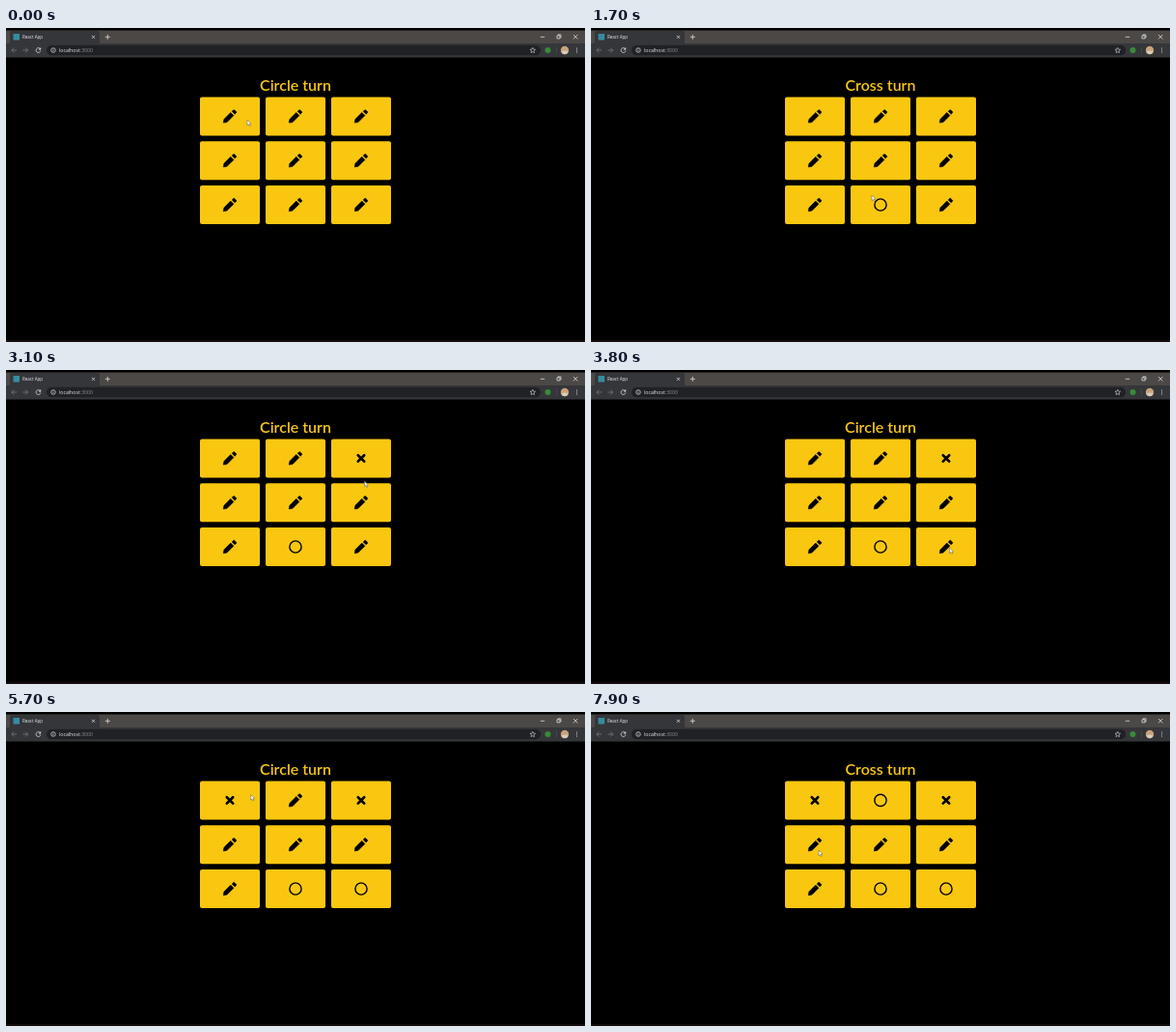
An HTML page for the animation above (8 s loop, 600 px wide and 325 px high).

```html
<!DOCTYPE html>
<html lang="en">
<head>
<meta charset="utf-8">
<title>Noughts and crosses</title>
<style>
  html, body { margin: 0; width: 100%; height: 100%; overflow: hidden; background: #000; }
  svg { display: block; width: 600px; height: 325px; }
  .ui { font-family: "Open Sans", "Noto Sans", sans-serif; fill: #e8eaed; }
  .line { fill: none; stroke: #dcdde0; stroke-width: .8; }
  .dim { stroke: #77797d; }
  #turn { font: 600 16px Lato, "Open Sans", sans-serif; fill: #f9c716; text-anchor: middle; }
</style>
</head>
<body>
<svg viewBox="0 0 600 325">
  <defs>
    <path id="pencil" d="M-6.7 6.7L-6.1 3 .8-3.9 3.9-.8-3 6.1zM2.2-5.1L3.6-6.5Q4.2-7 4.8-6.5L6.5-4.8Q7-4.2 6.5-3.6L5.1-2.2z"
      stroke="#000" stroke-width=".6" stroke-linejoin="round"/>
    <circle id="circle" r="6.1" fill="none" stroke="#000" stroke-width="1.4"/>
    <path id="cross" d="M-3.2-3.2L3.2 3.2M3.2-3.2L-3.2 3.2" stroke="#000" stroke-width="2.7" stroke-linecap="round"/>
  </defs>

  <!-- browser window -->
  <rect width="600" height="325"/>
  <rect y="2.5" width="600" height="14" fill="#4b4846"/>
  <path d="M2 16.5Q4 16.5 4 14V5Q4 3 6 3H95Q97 3 97 5V14Q97 16.5 99 16.5z" fill="#35363a"/>
  <rect y="16" width="600" height="14.5" fill="#35363a"/>
  <rect x="42" y="17.8" width="512" height="10.4" rx="5.2" fill="#202124"/>
  <rect y="323" width="600" height="2" fill="#140c0d"/>

  <rect x="7.5" y="6" width="6.5" height="6.5" fill="#358c9f"/>
  <text class="ui" x="17" y="11.2" font-size="4.5">React App</text>
  <text class="ui" x="55" y="24.9" font-size="5.2">localhost<tspan fill="#8d9094">:3000</tspan></text>

  <path class="line" d="M89 7.8l3 3m0-3l-3 3M102.8 9.3h5m-2.5-2.5v5"/>
  <path class="line" d="M553.8 9.3h4.4M571 7.9h3v3h-3zM572 7.9v-1h3v3h-1M588 7l4.4 4.4m0-4.4L588 11.4" stroke-width=".6"/>
  <path class="line dim" d="M11 23H5.8m2.5-2.5L5.8 23l2.5 2.5M17.5 23h5.2m-2.5-2.5L22.700 23l-2.5 2.5"/>
  <path class="line" d="M35.300 21.400A2.400 2.400 0 1 0 35.900 23.500"/>
  <path d="M36.200 20v2.600h-2.600z" fill="#dcdde0"/>
  <circle class="line" cx="49" cy="23" r="2.300" style="stroke-width:.7"/>
  <path class="line" d="M49 22.700v1.500M49 21.500v.6"/>
  <path class="line" d="M545.800 20.300l.8 1.800 2 .2-1.500 1.300.4 2-1.700-1-1.700 1 .4-2-1.500-1.300 2-.2z" style="stroke-width:.6"/>
  <circle cx="561.500" cy="23" r="3" fill="#388c37"/>
  <path d="M570.500 19.500v7" stroke="#55575a" stroke-width=".5"/>
  <circle cx="579" cy="23" r="4.200" fill="#c9a37b"/>
  <path d="M575.200 24.800a4.200 4.200 0 0 0 7.600 0q-3.800-2.500-7.600 0" fill="#d9cdbb"/>
  <g fill="#dcdde0">
    <circle cx="591.500" cy="21" r=".6"/><circle cx="591.500" cy="23" r=".6"/><circle cx="591.500" cy="25" r=".6"/>
  </g>

  <!-- game -->
  <text id="turn" x="300" y="65"></text>
  <g id="board"></g>
  <path id="cursor" d="M0 0V5.600L1.300 4.500 2.200 6.500 3.200 6.100 2.300 4.100H4z"
    fill="#fff" stroke="#555" stroke-width=".5" stroke-linejoin="round"/>
</svg>
<script>
  const LOOP = 8000, STEP = 100;
  const el = id => document.getElementById(id);

  // [time, cell]; circle moves first and the players alternate
  const moves = [[1600, 7], [2800, 2], [4000, 8], [5400, 0], [6400, 1]];

  // [time, x, y] of the cursor tip
  const path = [
    [0, 250, 95], [200, 250, 95], [300, 228, 215], [800, 228, 215], [1200, 291, 173],
    [1800, 291, 173], [2300, 362, 109.5], [2500, 368, 95], [2900, 368, 95], [3600, 380, 165],
    [3800, 371.5, 184], [4600, 371.5, 184], [5000, 236.5, 85], [5600, 236.5, 85],
    [5900, 288, 86.500], [6800, 288, 86.500], [7100, 235, 160], [7800, 235, 160],
    [7900, 236, 143], [LOOP, 236, 143]
  ];

  el("board").innerHTML = Array.from({ length: 9 }, (_, i) => {
    const x = 232 + i % 3 * 68, y = 91.4 + Math.floor(i / 3) * 45.8;
    return `<g transform="translate(${x} ${y})">
      <rect x="-31" y="-20" width="62" height="40" rx="2" fill="#f9c710"/><use/></g>`;
  }).join("");
  const icons = document.querySelectorAll("#board use");

  function cursorAt(time) {
    const next = path.findIndex(p => p[0] > time);
    const [t0, x0, y0] = path[next - 1], [t1, x1, y1] = path[next];
    const k = (time - t0) / (t1 - t0);
    return [x0 + (x1 - x0) * k, y0 + (y1 - y0) * k];
  }

  function draw(now) {
    const time = Math.floor(now % LOOP / STEP) * STEP;
    const marks = Array(9).fill("pencil");
    const played = moves.filter(m => m[0] <= time);
    played.forEach(([, cell], i) => marks[cell] = i % 2 ? "cross" : "circle");
    icons.forEach((icon, i) => icon.setAttribute("href", "#" + marks[i]));
    el("turn").textContent = (played.length % 2 ? "Cross" : "Circle") + " turn";
    el("cursor").setAttribute("transform", `translate(${cursorAt(time)})`);
  }

  const start = performance.now();
  function tick() {
    draw(performance.now() - start);
    requestAnimationFrame(tick);
  }
  tick();
</script>
</body>
</html>
```
